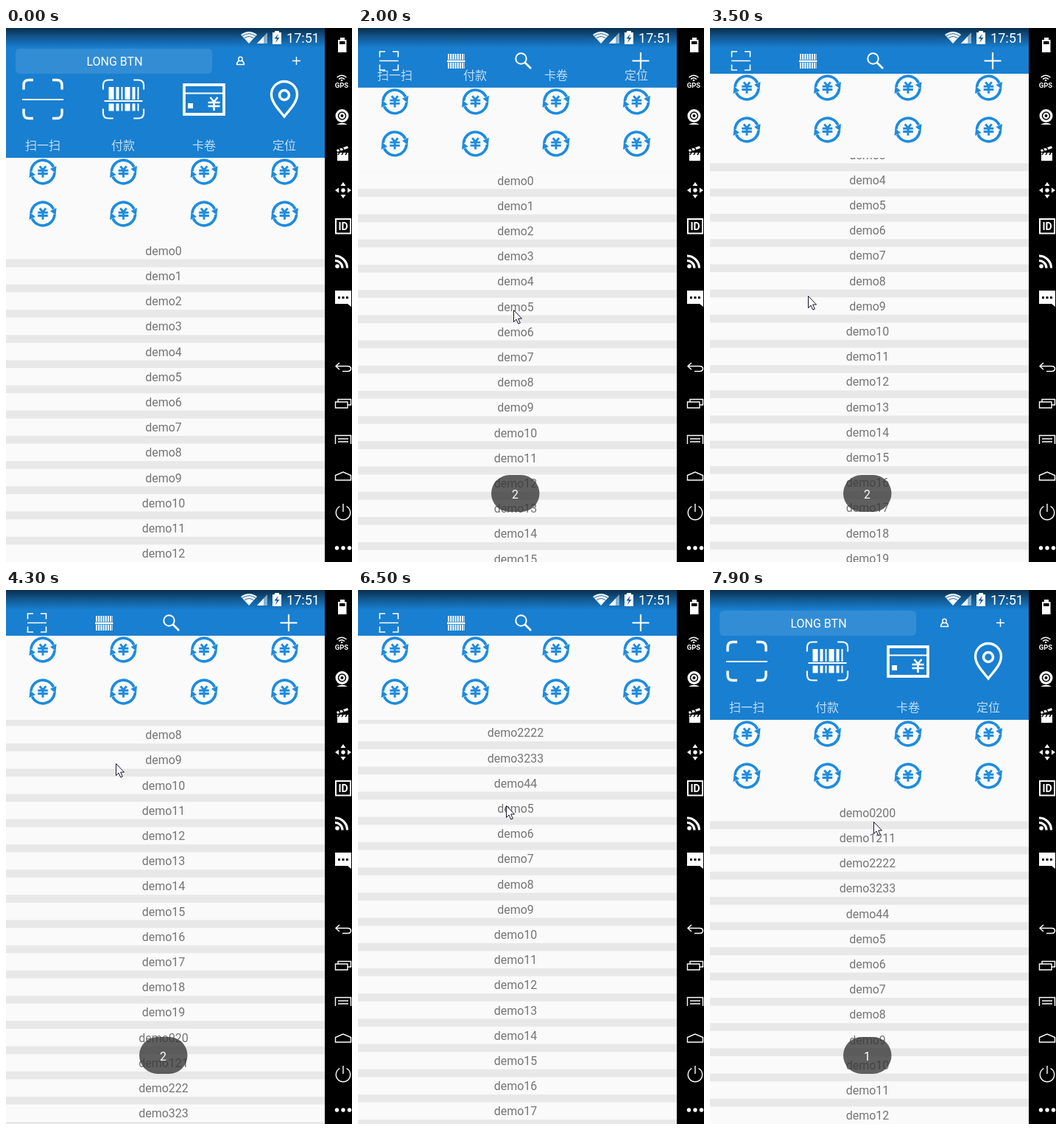
An HTML page for the animation above (8 s loop, 470 by 724 pixels).

```html
<!DOCTYPE html>
<html lang="zh">
<head>
<meta charset="utf-8">
<title>Collapsing header</title>
<style>
html, body { margin: 0; width: 100%; height: 100%; overflow: hidden; background: #000; }
svg { display: block; width: 100%; height: 100%; }
text { font-family: Roboto, "Noto Sans CJK SC", "Noto Sans CJK", sans-serif; font-size: 16px; text-anchor: middle; }
.line { fill: none; stroke: #fff; stroke-width: 2; }
.thin { fill: none; stroke: #fff; stroke-width: 1.4; }
.white { fill: #fff; }
.item { fill: #757575; }
.label { fill: #c3ddf2; }
.yen { fill: none; stroke: #1d8cdf; stroke-width: 3.6; }
</style>
</head>
<body>
<svg viewBox="0 0 470 724">
  <defs>
    <linearGradient id="shade" x2="0" y2="1">
      <stop offset="0" stop-color="#092e4c"/>
      <stop offset=".5" stop-color="#125b95"/>
      <stop offset="1" stop-color="#197fd0"/>
    </linearGradient>
    <clipPath id="listClip"><path d="M0 62H433V724H0Z"/></clipPath>
    <clipPath id="headClip"><path d="M0 27H433V176H0Z"/></clipPath>
    <path id="yenSign" d="M-5-9 0-3 5-9M0-3V9M-8-2H8M-8 3H8"/>
    <path id="corners" d="M-26-13V-19Q-26-26-19-26H-13M13-26H19Q26-26 26-19V-13M26 13V19Q26 26 19 26H13M-13 26H-19Q-26 26-26 19V13"/>
    <g id="arrow">
      <path d="M-16-1A16 16 0 0 1 14.500-6.500"/>
      <path d="M10-4 18.500-8 17.500 2Z" fill="#1d8cdf" stroke="none"/>
    </g>
    <g id="coin" class="yen">
      <use href="#arrow"/>
      <use href="#arrow" transform="rotate(180)"/>
      <use href="#yenSign" transform="scale(.85)" stroke-width="3.4"/>
    </g>
  </defs>

  <rect width="433" height="724" fill="#e8e8e8"/>
  <g clip-path="url(#listClip)"><g id="list"></g></g>
  <g id="grid"><rect y="150" width="433" height="140" fill="#fafafa"/></g>
  <rect id="blue" width="433" height="176" fill="#197fd0"/>

  <g clip-path="url(#headClip)">
    <g id="head">
      <g id="icons" class="line">
        <g transform="translate(50 96.500)">
          <use href="#corners" stroke-width="3.400"/>
          <path d="M-28 .500H28"/>
        </g>
        <g transform="translate(159.500 96.500)">
          <use href="#corners" transform="scale(1.060 1)"/>
          <path d="M-20-8H21" stroke-width="17" stroke-dasharray="7 3 4 3 2 3"/>
          <path d="M-20 11H21" stroke-width="10" stroke-dasharray="7 3 4 3 2 3"/>
          <path d="M-26 2.500H26"/>
        </g>
        <rect x="242" y="77" width="54" height="40" stroke-width="3.800"/>
        <path d="M242 88.500H296"/>
        <rect x="247" y="102" width="7" height="7" class="white" stroke="none"/>
        <use href="#yenSign" x="282.500" y="103" stroke-width="2.600"/>
        <path d="M378 120C371 111 360.500 101 360.500 90A17.500 17.500 0 0 1 395.500 90C395.500 101 385 111 378 120Z" stroke-width="3.400"/>
        <circle cx="378" cy="91" r="6.500" stroke-width="3.600"/>
      </g>
      <g id="labels" class="label">
        <text x="50" y="165">扫一扫</text><text x="159" y="165">付款</text>
        <text x="269" y="165">卡卷</text><text x="378" y="165">定位</text>
      </g>
    </g>
  </g>

  <g id="openBar">
    <rect x="13" y="28" width="267" height="34" rx="6" fill="#338dd5"/>
    <text x="147.500" y="51" class="white">LONG BTN</text>
    <g class="thin">
      <circle cx="318.500" cy="42" r="2.700"/>
      <path d="M316.500 44.500Q313.500 46 313.500 49.500H323.500Q323.500 46 320.500 44.500M389 44.500H400M394.500 39V50"/>
    </g>
  </g>
  <g id="shutBar" class="line">
    <g transform="translate(42 44.500)" stroke-width="1.600">
      <path d="M-12.500-5V-12.500H-5M5-12.500H12.500V-5M12.500 5V12.500H5M-5 12.500H-12.500V5M-13 0H13"/>
    </g>
    <path d="M122 39H145M122 51H145" stroke-width="8" stroke-dasharray="2 1.200"/>
    <path d="M121 45H145.500" stroke-width="2.400"/>
    <circle cx="221.500" cy="41.500" r="7.200"/>
    <path d="M226.500 46.500 235 55" stroke-width="2.800"/>
    <path d="M372.500 44.500H395.500M384 33V56" stroke-width="2.200"/>
  </g>

  <rect width="433" height="27" fill="url(#shade)"/>
  <g class="white">
    <path d="M330 21 319 9Q330 1 341 9Z"/>
    <path d="M321 10.500Q330 5 339 10.500M324 13.700Q330 9.500 336 13.700" fill="none" stroke="#14629f"/>
    <path d="M341 21 355 6V21Z" opacity=".5"/><path d="M341 21 350 11.500V21Z"/>
    <path d="M362 6H365V4H371V6H374V22H362Z"/>
    <path d="M370 8 364.500 14.500H368L366 20 371.500 13H368Z" fill="#12578f"/>
    <text x="403.500" y="20" style="font-size:18px">17:51</text>
  </g>

  <g id="toast">
    <rect x="181" y="606" width="65.500" height="50" rx="25" fill="#393939" fill-opacity=".8"/>
    <text id="toastText" x="213.500" y="638" class="white"></text>
  </g>

  <rect x="433" width="37" height="724"/>
  <g class="white">
    <path d="M454 13H460V16H462.500V33H451V16H454Z"/>
    <path d="M453 18H460.500V22H453Z" fill="#000"/>
    <path class="thin" d="M449.500 67Q456 61.500 462.500 67M452 69.500Q456 66 460 69.500"/>
    <circle cx="456" cy="71" r="1.300"/>
    <text x="456" y="80.500" style="font-size:9.500px;font-weight:700">GPS</text>
    <circle cx="456.500" cy="119" r="9"/>
    <circle cx="456.500" cy="119" r="5" stroke="#000" stroke-width="1.500"/>
    <circle cx="456.500" cy="119" r="2" fill="#000"/>
    <path d="M449 131Q456.500 126.500 464 131ZM450 169H465V180H450ZM449 165 464 160 465 163 450 168Z"/>
    <path d="M452 163.500 454 166.500M457 162 459 165M453 169 451 172M458 169 456 172M463 169 461 172" stroke="#000" stroke-width="1.500"/>
    <circle cx="458" cy="220" r="2.700"/>
    <path d="M458 209 461.500 214H454.500ZM458 231 461.500 226H454.500ZM447 220 452 216.500V223.500ZM469 220 464 216.500V223.500Z"/>
    <rect class="line" x="448" y="259" width="20" height="19.500"/>
    <text x="458" y="274" style="font-size:14px;font-weight:700">ID</text>
    <circle cx="450" cy="323" r="2.800"/>
    <path class="line" d="M447 315.500A10 10 0 0 1 457 325.500M447 309A16.500 16.500 0 0 1 463.500 325.500" style="stroke-width:3.200"/>
    <path d="M447 356H469V378L464 374H447Z"/>
    <path d="M451 365.500H465" stroke="#000" stroke-width="3" stroke-dasharray="3 2.500"/>
    <g class="thin">
      <path d="M453 454 448 458.500 453 463M448 458.500H464Q468.500 458.500 468.500 462Q468.500 465.500 464 465.500H457"/>
      <path d="M447.500 507H464V515H447.500ZM451 507V503.500H468.500V511H464"/>
      <path d="M447.500 564V552.500H468.500V564M451 557H465M451 561H465"/>
      <path d="M447.500 613V606.500L458 602 468.500 606.500V613Z"/>
      <path d="M453.500 648.500A9.700 9.700 0 1 0 462.500 648.500M458 645V656"/>
    </g>
    <circle cx="449.500" cy="705" r="2.700"/><circle cx="458" cy="705" r="2.700"/><circle cx="466.500" cy="705" r="2.700"/>
  </g>

  <path id="cursor" d="M.500.500V16.500L4 13 6.800 19 9.300 18 6.700 12H11.500Z" fill="#fff" stroke="#16162a"/>
</svg>
<script>
const LOOP = 8000, STEP = 100, FOLD = 114, PITCH = 34.2, BOTTOM = 382.7;
const $ = id => document.getElementById(id);
const clamp = v => Math.max(0, Math.min(1, v));
const ramp = (t, from, to) => clamp((t - from) / (to - from));

// Two swipes up to the end of the list, then one long swipe back.
const scrollAt = t =>
  141.8 * ramp(t, 1388, 2300) + (BOTTOM - 141.8) * ramp(t, 3004, 4320) - BOTTOM * ramp(t, 5370, 7470);

// Turning points of the pointer: time, x, y
const turns = [
  [300, 447, 85], [500, 330, 283], [900, 192, 424], [1100, 200, 496],
  [1400, 218, 479], [2000, 211, 382], [3500, 133, 363], [4300, 149, 235],
  [6500, 201, 292], [7600, 196, 399], [7900, 222, 314]
];

function pointerAt(t) {
  const i = Math.max(1, turns.findIndex(p => p[0] >= t));
  const [t0, x0, y0] = turns[i - 1], [t1, x1, y1] = turns[i];
  const k = ramp(t, t0, t1);
  return [x0 + (x1 - x0) * k, y0 + (y1 - y0) * k];
}

function add(parent, tag, attrs) {
  const el = document.createElementNS("http://www.w3.org/2000/svg", tag);
  for (const k in attrs) el.setAttribute(k, attrs[k]);
  return parent.appendChild(el);
}

const move = (id, x, y) => $(id).setAttribute("transform", `translate(${x} ${y})`);
const show = (id, on) => $(id).style.display = on ? "" : "none";

for (const y of [195, 252])
  for (let col = 0; col < 4; col++)
    add($("grid"), "use", { href: "#coin", x: 50 + col * 109.5, y });

const rows = Array.from({ length: 24 }, (_, i) => {
  const y = 290 + i * PITCH;
  add($("list"), "rect", { y, width: 433, height: 23.5, fill: "#fafafa" });
  return add($("list"), "text", { class: "item", x: 214, y: y + 17.7 });
});

// Loading more appends "k2k" rows; refreshing rewrites the first five.
function rowName(i, refreshed) {
  if (i >= 20) return `demo${i - 20}${i}`;
  if (!refreshed || i > 4) return `demo${i}`;
  return `demo${i < 4 ? `${i}2${i}` : i}${i}`;
}

function draw(now) {
  const t = Math.floor(now % LOOP / STEP) * STEP;
  const scroll = scrollAt(t), fold = Math.min(scroll, FOLD);
  const folded = scroll > 0.01;

  move("list", 0, -scroll);
  move("grid", 0, -fold);
  move("head", 0, -fold);
  $("icons").style.opacity = 1 - ramp(fold, 30, 90);
  $("labels").style.opacity = 1 - ramp(fold, 96, FOLD);
  $("blue").setAttribute("height", 176 - fold);
  rows.forEach((row, i) => row.textContent = rowName(i, t >= 4500));

  show("openBar", !folded);
  show("shutBar", folded);
  show("toast", t >= 1500 && t < 5000 || t >= 7500);
  $("toastText").textContent = t < 7500 ? "2" : "1";
  show("cursor", t >= 300);
  move("cursor", ...pointerAt(t));
}

const start = performance.now();
function tick() {
  draw(performance.now() - start);
  requestAnimationFrame(tick);
}
tick();
</script>
</body>
</html>
```
